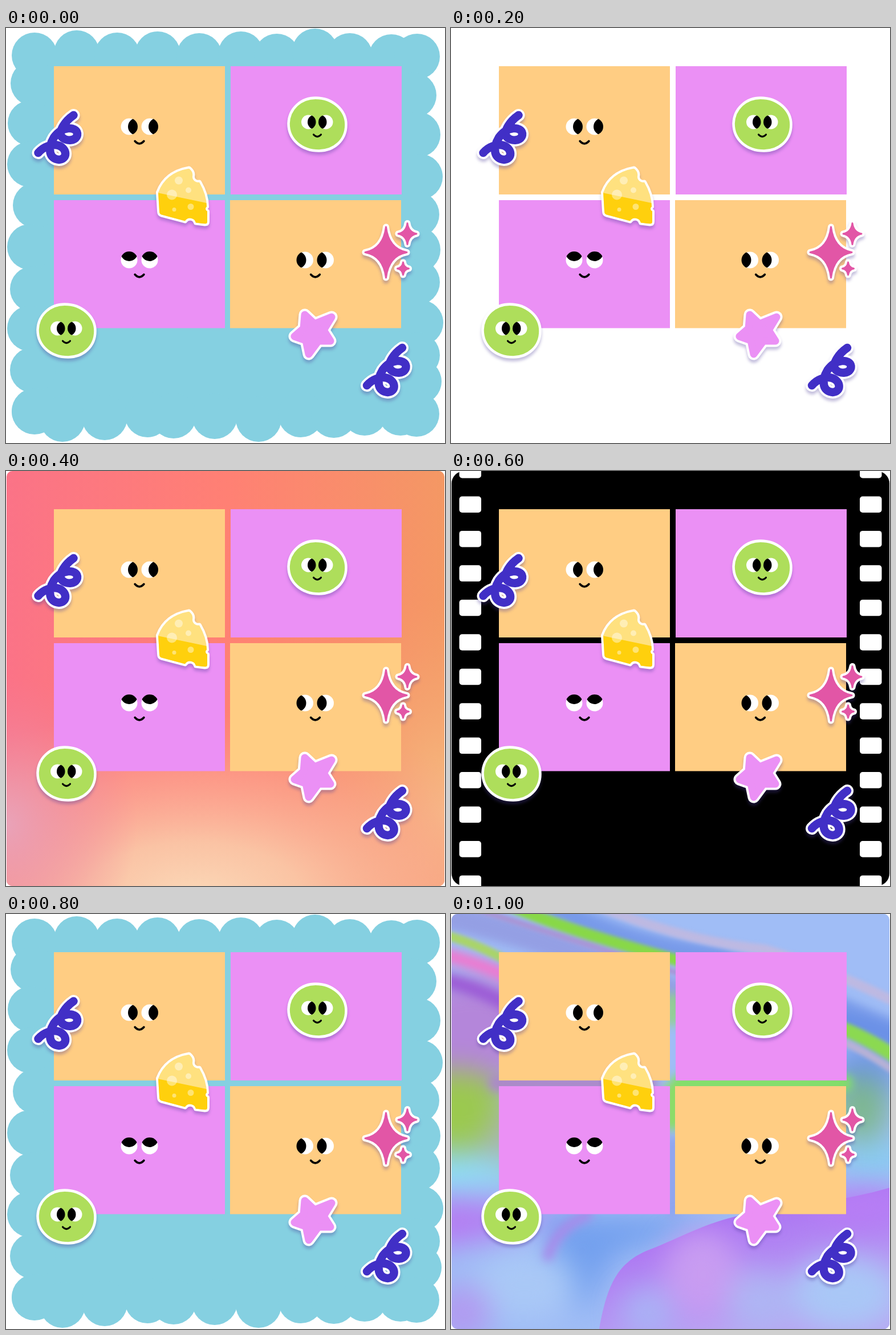
An HTML page for the animation above (1.2 s loop, 770 by 728 pixels).

```html
<!DOCTYPE html>
<html lang="en">
<head>
<meta charset="utf-8">
<title>Sticker frames</title>
<style>
html, body { margin: 0; width: 100%; height: 100%; overflow: hidden; background: #fff; }
svg { display: block; width: 100vw; height: 100vh; }
.scene { display: none; }
.scene.on { display: inline; }
.sticker { filter: drop-shadow(0 5px 2.5px rgba(70, 55, 150, .32)); }
.line { fill: none; stroke-linecap: round; stroke-linejoin: round; }
.b3 { filter: blur(3px); }
.b8 { filter: blur(8px); }
.b25 { filter: blur(25px); }
</style>
</head>
<body>
<svg viewBox="0 0 770 728">
  <defs>
    <clipPath id="card"><rect x="1" width="768" height="728" rx="10"/></clipPath>
    <linearGradient id="warm">
      <stop stop-color="#fb7387"/><stop offset=".5" stop-color="#ff8074"/><stop offset="1" stop-color="#f49864"/>
    </linearGradient>
    <radialGradient id="peach"><stop stop-color="#fbd9b8"/><stop offset=".3" stop-color="#fac9a8" stop-opacity=".92"/><stop offset=".65" stop-color="#fbaa94" stop-opacity=".6"/><stop offset="1" stop-color="#fb9486" stop-opacity="0"/></radialGradient>
    <radialGradient id="rose"><stop stop-color="#e9a3b9"/><stop offset="1" stop-color="#f0809a" stop-opacity="0"/></radialGradient>
    <radialGradient id="amber"><stop stop-color="#f5be84"/><stop offset="1" stop-color="#f6a470" stop-opacity="0"/></radialGradient>
    <linearGradient id="wave" x1="0" y1="0" x2=".5" y2="1">
      <stop stop-color="#8f5cf0"/><stop offset=".4" stop-color="#ae78f3"/><stop offset="1" stop-color="#b9a6f3"/>
    </linearGradient>
    <path id="spring" d="M118.500 153C104 163 92 180 97 190C104 200 126 199 125 185C123 172 98 172 84 192C72 212 76 230 93 231C108 230 108 212 92 206C80 203 66 208 56.500 219"/>
    <path id="cheese" d="M322 247Q281 254 268 289L270 322Q270 327 274 328L315 339A10.500 10.500 0 0 1 334 342L350 344Q354 344 354 340V322A4.500 4.500 0 0 1 353 314Q353 293 340 271A10 10 0 0 1 328 262Q330 253 322 247Z"/>
    <clipPath id="cheeseClip"><use href="#cheese"/></clipPath>
  </defs>

  <g class="scene on" id="scallop" fill="#85d0e1"><rect x="38" y="40" width="692" height="645"/></g>

  <g class="scene" id="sunset" clip-path="url(#card)">
    <rect width="770" height="728" fill="url(#warm)"/>
    <ellipse cx="770" cy="600" rx="260" ry="380" fill="url(#amber)"/>
    <ellipse cx="330" cy="750" rx="640" ry="330" fill="url(#peach)"/>
    <ellipse cx="0" cy="620" rx="230" ry="260" fill="url(#rose)"/>
  </g>

  <g class="scene" id="film"><rect x="1" width="768" height="728" rx="22"/></g>

  <g class="scene" id="swirl" clip-path="url(#card)">
    <rect width="770" height="728" fill="#a0bdf6"/>
    <g class="b25">
      <ellipse cx="40" cy="205" rx="150" ry="95" fill="#b486da"/>
      <ellipse cx="10" cy="345" rx="95" ry="72" fill="#9bc94f"/>
      <ellipse cx="110" cy="400" rx="45" ry="70" fill="#a9b4b4"/>
      <path d="M-40 425L120 440V465L-40 485Z" fill="#8be3f2"/>
      <path d="M-40 495L200 520L90 565L-40 590Z" fill="#b47cf2"/>
      <path d="M170 530H480L290 600L230 700L180 620Z" fill="#73a0ee"/>
      <ellipse cx="130" cy="650" rx="90" ry="60" fill="#a9c8f6"/>
      <ellipse cx="20" cy="700" rx="50" ry="50" fill="#b19af0"/>
      <ellipse cx="725" cy="285" rx="60" ry="55" fill="#6c92e8"/>
      <ellipse cx="720" cy="340" rx="48" ry="60" fill="#7db78f"/>
      <path d="M690 410L800 400V450L690 470Z" fill="#87cdf0"/>
    </g>
    <g class="line b8">
      <path d="M-30 0Q190 45 420 150" stroke="#949fe4" stroke-width="45"/>
      <path d="M165 -20Q300 55 470 75L800 215" stroke="#789ae9" stroke-width="38"/>
      <path d="M-20 115Q40 125 110 165" stroke="#9c5cd6" stroke-width="26"/>
      <path d="M-20 70Q40 82 110 115" stroke="#ee79cf" stroke-width="24"/>
      <path d="M660 185Q730 195 800 230" stroke="#6b91e7" stroke-width="38"/>
      <path d="M389 150V185" stroke="#93cf8c" stroke-width="24"/>
      <path d="M400 297H690" stroke="#82df65" stroke-width="30"/>
      <path d="M389 310V365" stroke="#8bdd61" stroke-width="30"/>
      <path d="M389 400V520" stroke="#8ea3ee" stroke-width="24"/>
      <path d="M80 297H350" stroke="#ab88c8" stroke-width="28"/>
      <path d="M170 600Q185 550 240 528" stroke="#a78bea" stroke-width="18"/>
    </g>
    <g class="line b3">
      <path d="M-20 34Q50 52 120 95" stroke="#a9d46a" stroke-width="16"/>
      <path d="M95 -18Q200 28 400 82" stroke="#88d848" stroke-width="20"/>
      <path d="M40 -10Q200 42 400 104" stroke="#a995d5" stroke-width="10"/>
      <path d="M255 -15Q410 48 550 62Q670 98 800 165" stroke="#bdb9e2" stroke-width="17"/>
      <path d="M670 195Q725 212 800 264" stroke="#8bd951" stroke-width="24"/>
      <path d="M670 218Q725 236 800 292" stroke="#b7b1d5" stroke-width="13"/>
    </g>
    <path d="M260 728C274 650 292 612 345 590C410 565 450 538 530 524C650 505 700 500 770 480V728Z" fill="url(#wave)"/>
    <g class="b25">
      <ellipse cx="440" cy="630" rx="65" ry="75" fill="#c89cf1"/>
      <ellipse cx="345" cy="700" rx="45" ry="45" fill="#a9b2f5"/>
      <ellipse cx="540" cy="680" rx="55" ry="55" fill="#aeb5f3"/>
      <ellipse cx="690" cy="665" rx="95" ry="65" fill="#a9c7f6"/>
      <ellipse cx="720" cy="515" rx="85" ry="35" fill="#b77df5"/>
    </g>
  </g>

  <g fill="#ffcd83"><rect x="84" y="67" width="300" height="225"/><rect x="393" y="302" width="300" height="224.500"/></g>
  <g fill="#eb90f5"><rect x="394" y="67" width="300" height="225"/><rect x="84" y="302" width="300" height="224.500"/></g>

  <g id="faces"></g>

  <g class="sticker" transform="translate(-1 -.5)">
    <use href="#cheese" fill="#fff" stroke="#fff" stroke-width="8" stroke-linejoin="round"/>
    <g clip-path="url(#cheeseClip)">
      <rect x="260" y="240" width="100" height="110" fill="#ffe17f"/>
      <path d="M260 288L360 309V350H260Z" fill="#ffd00d"/>
      <g fill="#fff" fill-opacity=".42">
        <circle cx="304" cy="268" r="7"/><circle cx="292" cy="293" r="9"/><circle cx="321" cy="285" r="5"/>
        <circle cx="325" cy="314" r="5.500"/><circle cx="296" cy="319" r="3.500"/>
      </g>
    </g>
  </g>

  <g id="springs"></g>
  <g class="sticker" id="sparkles"></g>
  <g class="sticker line" id="star"></g>
</svg>
<script>
const $ = id => document.getElementById(id);
const add = (id, markup) => $(id).insertAdjacentHTML('beforeend', markup);
const circle = (x, y, r, extra = '') => `<circle cx="${x}" cy="${y}" r="${r}" ${extra}/>`;

// Scalloped edge: outermost points of the bumps on each side
const R = 40;
const sides = {
  top: [[50, 8], [124, 4], [195, 8], [266, 6], [339, 9], [412, 6], [475, 10], [542, 1], [603, 9], [676, 11], [721, 10]],
  left: [[8, 97], [3, 167], [2, 239], [12, 311], [2, 384], [7, 458], [2, 527], [7, 600], [10, 673]],
  right: [[755, 118], [762, 187], [766, 261], [760, 327], [762, 389], [761, 446], [767, 517], [761, 574], [764, 620], [760, 677]],
  bottom: [[50, 712], [99, 726], [173, 723], [248, 718], [294, 720], [366, 721], [443, 726], [517, 718], [575, 719], [629, 715], [692, 715]]
};
const inward = { top: [0, R], left: [R, 0], right: [-R, 0], bottom: [0, -R] };
for (const side in sides)
  for (const [x, y] of sides[side])
    add('scallop', circle(x + inward[side][0], y + inward[side][1], R));

for (let i = 0; i < 13; i++)
  for (const x of [14.5, 717])
    add('film', `<rect x="${x}" y="${-16 + 60.45 * i}" width="38.500" height="28.500" rx="5" fill="#fff"/>`);

// The pupil is a disc shifted by (dx, dy) and cut off by the eye
let eyes = 0;
function eye(x, y, r, dx, dy) {
  const id = 'eye' + eyes++;
  return `<clipPath id="${id}">${circle(x, y, r)}</clipPath>` + circle(x, y, r - .5, 'fill="#fff"') +
    circle(x + dx, y + dy, r, `clip-path="url(#${id})"`);
}
const mouth = (x, y, w) =>
  `<path class="line" d="M${x - w} ${y}Q${x} ${y + w * 1.1} ${x + w} ${y}" stroke="#000" stroke-width="${w * .48}"/>`;
const face = (x, y, dx, dy) =>
  add('faces', eye(x - 18, y, 15, dx, dy) + eye(x + 18, y, 15, dx, dy) + mouth(x, y + 25.5, 7.8));
face(234, 173, 13, 0);
face(234, 407, 0, -13);
face(542.5, 407, -13, 0);

function blob(x, y) {
  const body = 'M-50 -1C-49 -27 -28 -45 -3 -45C27 -45 50 -24 50 1C50 28 29 46 3 46C-27 46 -50 27 -50 -1Z';
  add('faces', `<g class="sticker" transform="translate(${x} ${y})">
    <path d="${body}" fill="#aede5b" stroke="#fff" stroke-width="4.500" transform="scale(1.01 1.02)"/>
    ${eye(-15.5, -3.5, 13, 11.5, 0)}${eye(15, -3.5, 13, -11.5, 0)}${mouth(0, 18.5, 6.5)}</g>`);
}
blob(546, 168.5);
blob(106, 530.5);

for (const at of ['0 0', '576.5 408'])
  add('springs', `<g class="sticker line" transform="translate(${at})">
    <use href="#spring" stroke="#fff" stroke-width="22"/><use href="#spring" stroke="#412fc6" stroke-width="14.500"/></g>`);

function sparkle(x, y, w, h) {
  const a = w * .13, b = h * .13;
  return `M${x} ${y - h}Q${x + a} ${y - b} ${x + w} ${y}Q${x + a} ${y + b} ${x} ${y + h}` +
    `Q${x - a} ${y + b} ${x - w} ${y}Q${x - a} ${y - b} ${x} ${y - h}Z`;
}
const sparkles = sparkle(666.5, 393.5, 36.5, 44.5) + sparkle(704, 361, 16, 18.5) + sparkle(696.5, 422, 10, 11);
const star = 'M524 503L541 519L571 507L557 530L569 549L548 549L531 572L526 548L506 541L522 527Z';
const outlined = (id, d, color, width) => {
  for (const [c, w] of [['#fff', width + 8], [color, width]])
    add(id, `<path d="${d}" fill="${c}" stroke="${c}" stroke-width="${w}" stroke-linejoin="round"/>`);
};
outlined('sparkles', sparkles, '#e256a6', 3);
outlined('star', star, '#eb90f5', 13);

const order = ['scallop', '', 'sunset', 'film', 'scallop', 'swirl'];
const scenes = document.querySelectorAll('.scene');
function tick() {
  const current = order[Math.floor(performance.now() / 200) % order.length];
  scenes.forEach(s => s.classList.toggle('on', s.id === current));
  requestAnimationFrame(tick);
}
tick();
</script>
</body>
</html>
```
